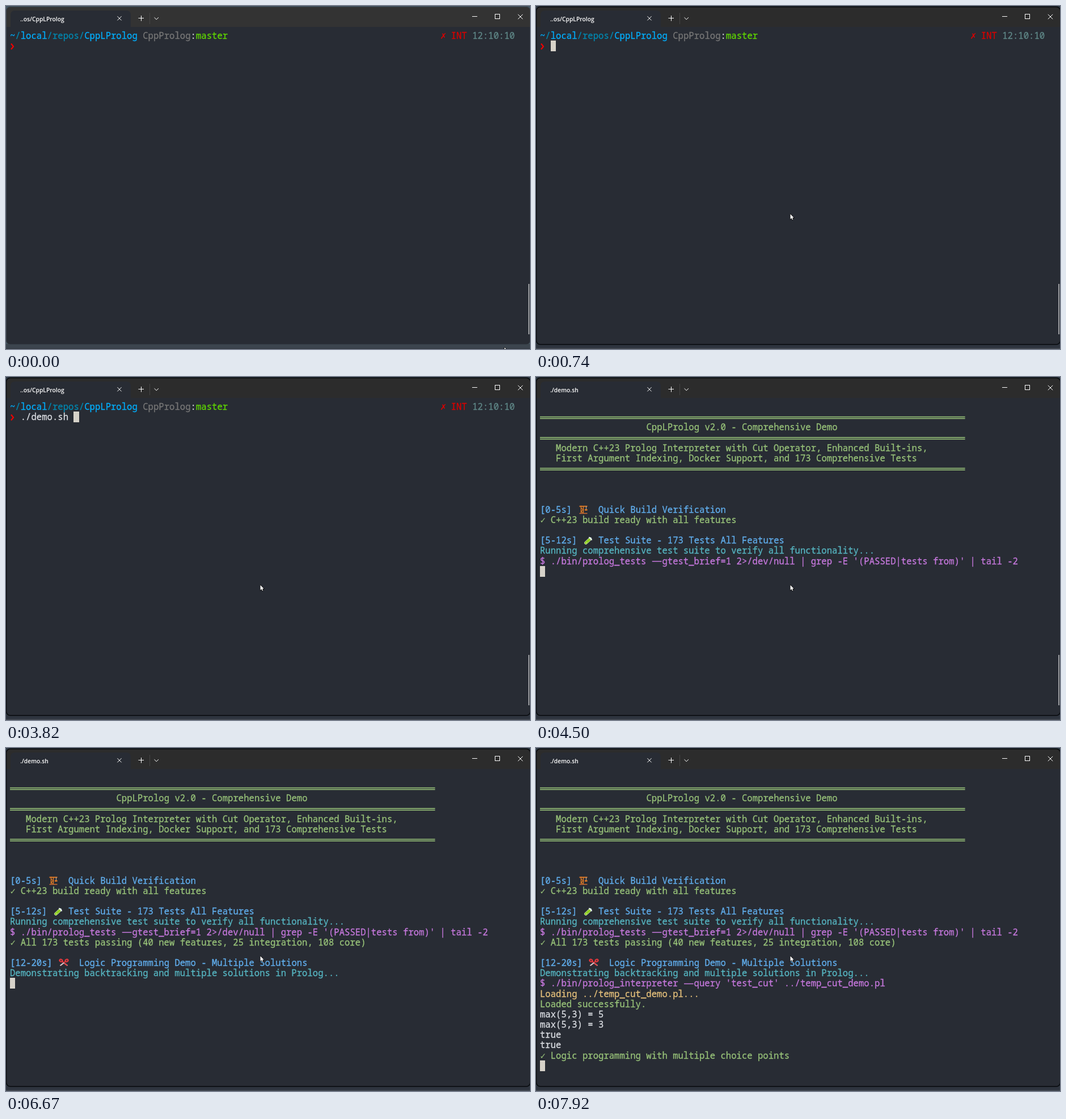
An HTML page with a canvas for the animation above (8000 ms loop, 924x606 px).

```html
<!DOCTYPE html>
<html lang="en">
<head>
<meta charset="utf-8">
<title>Terminal demo</title>
<style>
html, body { margin: 0; width: 100%; height: 100%; overflow: hidden; background: #282c34; }
canvas { display: block; }
</style>
</head>
<body>
<canvas id="stage" width="924" height="606"></canvas>
<script>
const ctx = document.getElementById('stage').getContext('2d');
const LOOP = 8000, FOCUS = 590, SCROLLBAR_END = 4540;
const LEFT = 7, CELL = 9.37, TOP = 43.4, ROW = 18.17;
const MONO = '15.62px "Noto Sans Mono", "DejaVu Sans Mono", monospace';
const SYMBOL = '14px "DejaVu Sans", sans-serif';
const TAB = '600 10.3px "Open Sans", "Noto Sans", sans-serif';
const C = {
  bg: '#282c34', fg: '#dcdfe4', green: '#98c379', blue: '#61afef', cyan: '#56b6c2',
  pink: '#c678dd', yellow: '#e5c07b', cursor: '#d6d2c9',
  path: '#00afff', dim: '#0087af', gray: '#767676', branch: '#5fd700',
  error: '#d70000', clock: '#5f8787'
};

// Script output: [time, row, column, colour, text]
const OUTPUT = [
  [4500, 2, 20, 'green', 'CppLProlog v2.0 - Comprehensive Demo'],
  [4500, 4, 3, 'green', 'Modern C++23 Prolog Interpreter with Cut Operator, Enhanced Built-ins,'],
  [4500, 5, 3, 'green', 'First Argument Indexing, Docker Support, and 173 Comprehensive Tests'],
  [4500, 10, 0, 'blue', '[0-5s]'],
  [4500, 10, 11, 'blue', 'Quick Build Verification'],
  [4500, 11, 0, 'green', '✓ C++23 build ready with all features'],
  [4500, 13, 0, 'blue', '[5-12s]'],
  [4500, 13, 11, 'blue', 'Test Suite - 173 Tests All Features'],
  [4500, 14, 0, 'cyan', 'Running comprehensive test suite to verify all functionality...'],
  [4500, 15, 0, 'pink', "$ ./bin/prolog_tests --gtest_brief=1 2>/dev/null | grep -E '(PASSED|tests from)' | tail -2"],
  [5680, 16, 0, 'green', '✓ All 173 tests passing (40 new features, 25 integration, 108 core)'],
  [6670, 18, 0, 'blue', '[12-20s]'],
  [6670, 18, 13, 'blue', 'Logic Programming Demo - Multiple Solutions'],
  [6670, 19, 0, 'cyan', 'Demonstrating backtracking and multiple solutions in Prolog...'],
  [6740, 20, 0, 'pink', "$ ./bin/prolog_interpreter --query 'test_cut' ../temp_cut_demo.pl"],
  [6740, 21, 0, 'yellow', 'Loading ../temp_cut_demo.pl...'],
  [6740, 22, 0, 'green', 'Loaded successfully.'],
  [6740, 23, 0, 'fg', 'max(5,3) = 5'],
  [6740, 24, 0, 'fg', 'max(5,3) = 3'],
  [6740, 25, 0, 'fg', 'true'],
  [6740, 26, 0, 'fg', 'true'],
  [7920, 27, 0, 'green', '✓ Logic programming with multiple choice points']
];
const TYPED = [[0, ''], [2550, '.'], [2600, './'], [3140, './d'], [3410, './de'], [3540, './dem'], [3820, './demo.sh ']];
const CURSOR_ROWS = [[4500, 16], [5680, 17], [6670, 20], [6740, 27], [7920, 28]];

const latest = (list, t) => list.filter(e => e[0] <= t).pop()[1];
const colX = col => LEFT + col * CELL;

function rect(x, y, w, h, color) {
  ctx.fillStyle = color;
  ctx.fillRect(x, y, w, h);
}

function line(points, color, width = 1) {
  ctx.beginPath();
  points.forEach(([x, y], i) => i ? ctx.lineTo(x, y) : ctx.moveTo(x, y));
  ctx.strokeStyle = color;
  ctx.lineWidth = width;
  ctx.stroke();
}

function poly(points, color) {
  ctx.beginPath();
  points.forEach(p => ctx.lineTo(...p));
  ctx.closePath();
  ctx.fillStyle = color;
  ctx.fill();
}

function cross(x, y, r) {
  line([[x - r, y - r], [x + r, y + r]], '#fff');
  line([[x + r, y - r], [x - r, y + r]], '#fff');
}

function text(row, col, color, str) {
  const base = 58 + row * ROW;
  ctx.fillStyle = ctx.strokeStyle = C[color];
  if (/^[✓✗]/.test(str)) {
    ctx.font = SYMBOL;
    ctx.fillText(str[0], colX(col) - 0.5, base);
    str = ' ' + str.slice(1);
  }
  // a hairline outline gives the terminal's medium weight
  const plain = str.replace('--', '  ');
  ctx.font = MONO;
  ctx.lineWidth = 0.3;
  ctx.fillText(plain, colX(col), base);
  ctx.strokeText(plain, colX(col), base);
  // double hyphens join into one stroke
  const dash = str.indexOf('--');
  if (dash >= 0) rect(colX(col + dash) + 1, base - 5.6, 2 * CELL - 2, 1.5, C[color]);
}

function block(row, col) {
  const left = Math.round(colX(col)), right = Math.round(colX(col + 1));
  rect(left, Math.floor(TOP + row * ROW), right - left, 19, C.cursor);
}

function frame(focused, title, scrollbar) {
  rect(0, 0, 924, 606, focused ? '#2d3842' : '#465864');
  rect(0, 597, 924, 9, focused ? '#2e343e' : '#3c454e');
  rect(0, 604.5, 924, 1.5, focused ? '#454a53' : '#343b44');
  ctx.beginPath();
  ctx.roundRect(0.5, 1.5, 924, 596.5, 7);
  ctx.fillStyle = C.bg;
  ctx.fill();
  ctx.save();
  ctx.clip();
  rect(0, 0, 924, 37, focused ? '#2c2c2c' : '#333333');
  ctx.restore();
  ctx.strokeStyle = focused ? '#07090c' : '#3b444c';
  ctx.lineWidth = focused ? 1.5 : 1;
  ctx.stroke();

  ctx.beginPath();
  ctx.roundRect(8, 8, 212, 30, [7, 7, 0, 0]);
  ctx.fillStyle = C.bg;
  ctx.fill();
  ctx.font = TAB;
  ctx.fillStyle = '#fff';
  ctx.fillText(title, 25, 26.5);
  cross(200, 21.8, 3.6);
  line([[233.5, 21.5], [243, 21.5]], '#fff');
  line([[238.5, 17], [238.5, 26.5]], '#fff');
  line([[253.5, 12], [253.5, 32]], '#444');
  line([[261.5, 20.2], [265.2, 23.8], [269, 20.2]], '#fff');
  line([[822, 18.5], [831, 18.5]], '#fff');
  ctx.strokeStyle = '#fff';
  ctx.strokeRect(862.5, 14.5, 8, 8);
  cross(907, 19, 4.2);
  if (scrollbar) rect(921, 491, 2, 89, '#9d9fa2');
}

function prompt(typed, focused) {
  text(0, 0, 'path', '~');
  text(0, 1, 'dim', '/');
  text(0, 2, 'path', 'local');
  text(0, 7, 'dim', '/repos/');
  text(0, 14, 'path', 'CppLProlog');
  text(0, 25, 'gray', 'CppProlog');
  text(0, 34, 'fg', ':');
  text(0, 35, 'branch', 'master');
  text(0, 81, 'error', '✗');
  text(0, 83, 'error', 'INT');
  text(0, 87, 'clock', '12:10:10');
  line([[9, 66.5], [13, 71.5], [9, 76.5]], '#f00000', 2.2);
  text(1, 2, 'fg', typed);
  if (focused) block(1, 2 + typed.length);
}

function crane(x, y) {
  const o = '#e07b26';
  line([[x + 1, y + 2], [x + 15, y + 2]], o, 2);
  line([[x + 4, y + 1], [x + 4, y + 14]], o, 1.4);
  line([[x + 8, y + 2], [x + 8, y + 14]], o, 1.4);
  line([[x + 4, y + 5], [x + 8, y + 8], [x + 4, y + 11], [x + 8, y + 14]], o, 1.2);
  line([[x + 13, y + 2], [x + 13, y + 7]], '#b8b8b8');
  rect(x + 10.5, y + 7, 4.5, 2.5, o);
  rect(x + 1, y + 13.5, 14, 2, '#a65c32');
}

function tube(x, y) {
  ctx.lineCap = 'round';
  line([[x + 3.5, y + 12], [x + 11, y + 5]], '#d9e8e3', 5.6);
  line([[x + 3.5, y + 12], [x + 9.5, y + 6.5]], '#8fce22', 4.6);
  line([[x + 9.5, y + 2.5], [x + 13.5, y + 6.5]], '#e8f1ee', 2);
  ctx.lineCap = 'butt';
  rect(x + 4, y + 11, 1.5, 1.5, '#d5f28a');
}

function scissors(x, y) {
  const red = '#e8383d';
  for (const side of [-1, 1]) {
    const at = dx => x + 8 + side * dx;
    line([[at(-6.5), y + 13], [at(0), y + 8]], '#c9cdd2', 2);
    line([[at(0), y + 8], [at(3), y + 5.5]], red, 2.2);
    ctx.beginPath();
    ctx.ellipse(at(5), y + 4, 2.6, 2, -side * 0.6, 0, 2 * Math.PI);
    ctx.stroke();
    line([[at(1), y + 9], [at(6), y + 13]], red, 2);
  }
}

function rule(row) {
  const mid = TOP + (row + 0.5) * ROW;
  for (const dy of [-1, 1.9]) rect(LEFT, mid + dy, 80 * CELL, 1.6, C.green);
}

function output(t) {
  [1, 3, 6].forEach(rule);
  for (const [at, ...rest] of OUTPUT) if (t >= at) text(...rest);
  crane(75.5, 226.5);
  tube(84.5, 281);
  if (t >= 6670) scissors(94, 371.5);
  block(latest(CURSOR_ROWS, t), 0);
}

function pointer(t) {
  const step = Math.floor((t - 70) / 74.4 + 1);
  const p = Math.min(1, Math.max(0, step / 7));
  const e = p * p * (3 - 2 * p);
  const x = 879 - 430.5 * e, y = 603 - 235.5 * e;
  const arrow = [[0, 0], [0, 9.2], [2.1, 7.3], [3.5, 10.3], [4.9, 9.7], [3.6, 6.8], [6.2, 6.6]]
    .map(([dx, dy]) => [x + dx, y + dy]);
  line([...arrow, arrow[0]], '#000', 1.4);
  poly(arrow, '#fff');
}

function draw(t) {
  const focused = t >= FOCUS, running = t >= 4500;
  frame(focused, running ? './demo.sh' : '..os/CppLProlog', t < SCROLLBAR_END);
  if (running) output(t);
  else prompt(latest(TYPED, t), focused);
  pointer(t);
}

const start = performance.now();
function tick() {
  draw((performance.now() - start) % LOOP);
  requestAnimationFrame(tick);
}
tick();
</script>
</body>
</html>
```
